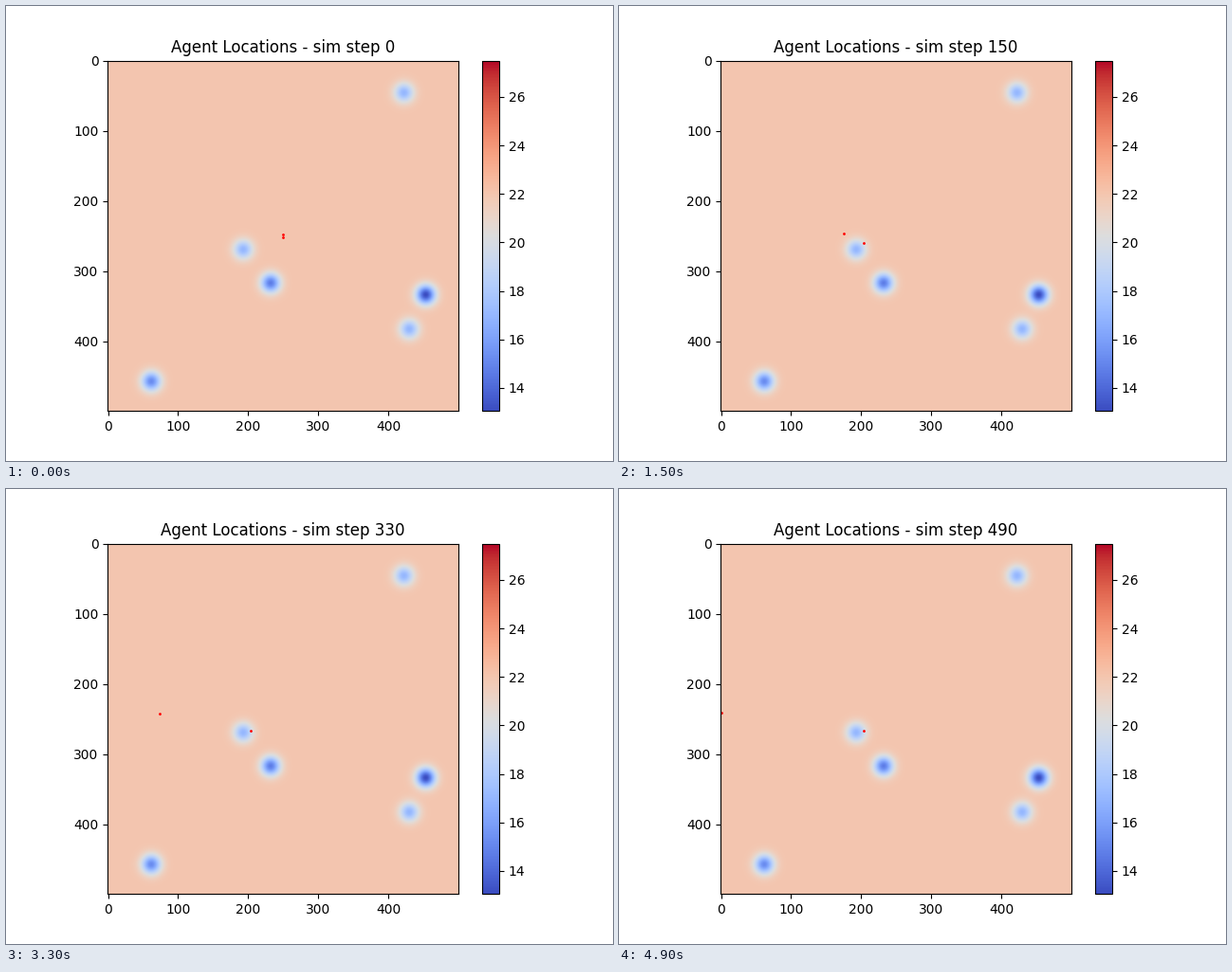
Write a matplotlib script that moves like this. It is 640 by 480 pixels and loops after 5000 ms.

```python
import numpy as np
import matplotlib.pyplot as plt
from matplotlib.animation import FuncAnimation

SIZE = 500
FRAMES = 50
STEPS_PER_FRAME = 10
AMBIENT = 22.0
COLDEST, HOTTEST = 13.05, 27.5
SPREAD = 9.6

# x, y and centre temperature of each cold spot
COLD_SPOTS = [
    (422, 46, 17),
    (193, 269.5, 17),
    (232, 317.3, 14.7),
    (453, 334, COLDEST),
    (429.5, 383, 17),
    (62, 457.5, 15.2),
]


def temperature_field():
    y, x = np.mgrid[:SIZE, :SIZE]
    field = np.full((SIZE, SIZE), AMBIENT)
    for cx, cy, temp in COLD_SPOTS:
        dist2 = (x - cx) ** 2 + (y - cy) ** 2
        field += (temp - AMBIENT) * np.exp(-dist2 / (2 * SPREAD ** 2))
    return field


def wanderer(step):
    """Drift left, slowly gaining speed, and stop at the wall."""
    step = min(step, 453)
    return max(0, 249.5 - 230 * (step / 420) ** 1.1), 248 - 0.016 * step


def settler(step):
    """Run to the edge of the nearest cold spot, then ease down along it."""
    slide = np.clip((step - 60) / 270, 0, 1)
    return max(203.7, 249.5 - 0.553 * step), 251.7 + 15.3 * (1 - (1 - slide) ** 1.7)


fig, ax = plt.subplots(figsize=(6.4, 4.8), dpi=100)
image = ax.imshow(temperature_field(), cmap="coolwarm", vmin=COLDEST, vmax=HOTTEST)
fig.colorbar(image, ax=ax)
agents = ax.scatter([0, 0], [0, 0], s=1, color="red")
ax.set_xlim(-0.5, SIZE - 0.5)
ax.set_ylim(SIZE - 0.5, -0.5)
title = ax.set_title("")


def update(frame):
    step = frame * STEPS_PER_FRAME
    agents.set_offsets([wanderer(step), settler(step)])
    title.set_text(f"Agent Locations - sim step {step}")
    return agents, title


anim = FuncAnimation(fig, update, frames=FRAMES, interval=100,
                     repeat=True, repeat_delay=0, blit=False)
plt.show()
```
